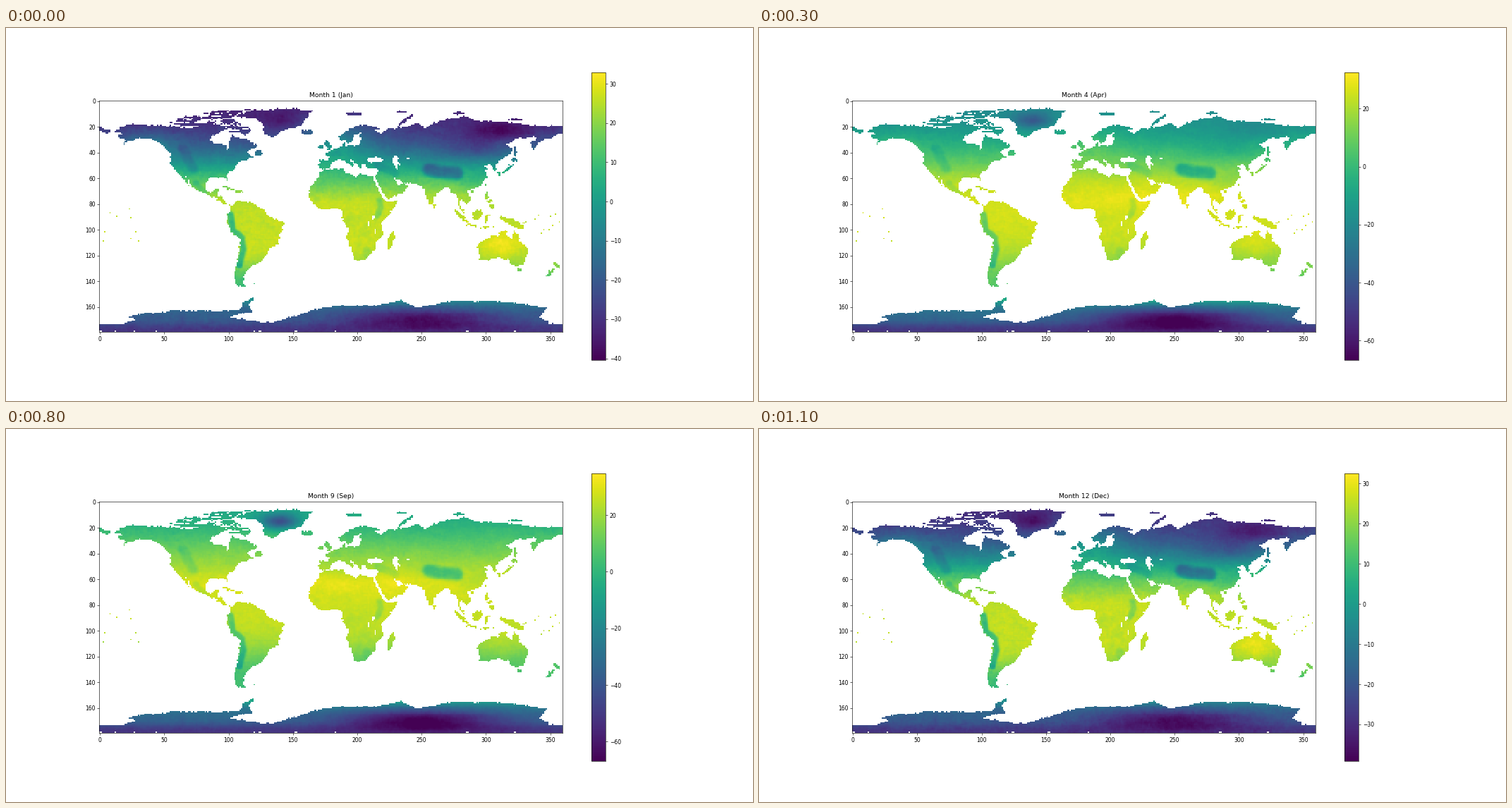
Recreate the animation shown at these times as a matplotlib script. Size 1059 px wide and 529 px high, loop 1.2 s.

```python
import numpy as np
import matplotlib.pyplot as plt
from matplotlib.animation import FuncAnimation
from matplotlib.path import Path

MONTHS = "Jan Feb Mar Apr May Jun Jul Aug Sep Oct Nov Dec".split()
# Colour range of each month
LOW = [-40.4, -47.1, -58, -66.7, -66.5, -67.1, -68.5, -68, -66.8, -58.9, -45.5, -39.1]
HIGH = [32.8, 32.1, 32.3, 32.4, 35.2, 37.4, 38.4, 37.9, 34.6, 30.9, 31.4, 32.4]

rng = np.random.default_rng(4)
lon, lat = np.meshgrid(np.arange(360) - 179.5, 89.5 - np.arange(180))
land = np.zeros(lon.shape, bool)


def noise(nx, ny):
    """Box-blurred random field with unit variance."""
    a = rng.normal(size=lon.shape)
    a = sum(np.roll(a, k, 1) for k in range(nx))
    a = sum(np.roll(a, k, 0) for k in range(ny))
    return a / a.std()


# Shapes are tested on slightly shaken cells, which crinkles every coast
shaken_x = lon + 0.4 * noise(2, 2)
shaken_y = lat + 0.3 * noise(2, 2)
cells = np.column_stack([shaken_x.ravel(), shaken_y.ravel()])


def polygon(*xy):
    inside = Path(np.reshape(xy, (-1, 2))).contains_points(cells)
    return inside.reshape(land.shape)


def shape(*xy):
    land[polygon(*xy)] = True


def blob(x, y, rx, ry, tilt=0, fill=True):
    """Tilted ellipse of land, or of water when fill is False."""
    a = np.radians(tilt)
    dx, dy = shaken_x - x, shaken_y - y
    u = (dx * np.cos(a) + dy * np.sin(a)) / rx
    v = (dy * np.cos(a) - dx * np.sin(a)) / ry
    land[u**2 + v**2 < 1] = fill


# Canadian Arctic: one region broken into horizontal streaks
arctic = polygon(-125, 70, -125, 74.5, -105, 78.5, -92, 81.5, -63, 83, -78, 76,
                 -62, 67, -66, 62.5, -78, 65, -88, 69)
land |= arctic & (noise(8, 1) > -0.25)

# North America
shape(-168, 66, -157, 71.2, -128, 70, -108, 68, -94, 72, -82, 69, -87, 64.5, -94.5, 60,
      -92, 57, -82, 55, -80, 51.3, -79, 54.5, -77.5, 62.5, -70, 60, -65, 60, -56, 53,
      -66, 50, -65, 48.5, -60, 46, -66, 43.6, -70.5, 42, -76, 36, -81, 31.5, -80.3, 25.3,
      -83, 29.7, -94, 29.5, -97.6, 25, -96, 19, -91.5, 18.6, -90, 21.3, -87, 21.3,
      -88.5, 15.9, -83.4, 15, -82, 9, -77.3, 8.2, -83, 8.4, -88, 13, -95, 16, -105.5, 20.5,
      -113, 31, -110, 23.2, -115, 29, -120.6, 34.6, -124.3, 41, -124.5, 48.5, -133, 57,
      -140, 59.8, -150, 60.5, -163, 54.8, -158, 58.7, -165.5, 61.5, -161.5, 64)
shape(-73, 78.2, -60, 82, -32, 83.6, -14, 81.8, -19, 76, -23, 70.3, -40, 65.5,
      -44.5, 60.5, -52, 64, -52, 70, -58, 75.5, -71, 77)
blob(-56, 49, 2.8, 2)
blob(-79.5, 21.8, 5, 0.8, -15)
blob(-71, 19, 2.8, 0.9)

# South America
shape(-77.5, 8, -72, 12, -62, 10.6, -51, 4, -49, 0, -35.5, -5.3, -39, -14, -41, -22,
      -48, -25.5, -49, -29, -54, -34.5, -57.5, -37.5, -62, -39, -65, -42.5, -67, -46,
      -69, -51, -66, -55, -71, -54.5, -75.3, -49, -73.7, -40, -71.5, -30, -70.3, -18.5,
      -76, -14, -81, -5.5, -80, 1, -77.5, 4)
blob(-59.5, -51.8, 1.6, 0.5)

# Africa
shape(-6, 35.8, 10.5, 37.1, 11, 33.8, 20, 30.6, 22, 32.8, 32.5, 31, 35.5, 24, 38, 18,
      43, 11.5, 51.2, 11.8, 47, 3, 39.5, -5, 40.6, -15, 35, -20, 35.4, -24, 32.5, -28,
      27, -33.8, 19, -34.7, 14.5, -22.5, 12, -17, 13.5, -10, 9, -1, 9, 4, 4.5, 6.3,
      -7.5, 4.4, -13.3, 9, -17.2, 14.7, -16.5, 21, -10, 29.5)
blob(46.8, -18.8, 7, 2, 72)
blob(33, -1, 1.3, 1.5, fill=False)
blob(29.8, -6, 0.7, 2.4, fill=False)
blob(34.5, -12, 0.6, 2, fill=False)

# Europe and western Asia
shape(-9, 37.2, -9, 43.2, -1.5, 43.4, -1.2, 46, -4.6, 48.4, 2, 51, 8.3, 54, 10, 57.5,
      10.8, 54.2, 21, 55, 23.5, 59.5, 30, 60, 22, 60.3, 21.5, 63, 25, 65.5, 18, 62.5,
      17, 58, 13, 55.6, 11, 59, 8, 58, 5.3, 61, 14, 67.5, 25, 71, 40, 67.3, 34, 66.5,
      38, 64, 44, 67.5, 60, 69, 60, 25.5, 57, 26, 51, 28, 48.5, 30, 52, 24, 56.2, 26,
      59.8, 22.4, 55, 17.2, 43.5, 12.7, 39, 21, 34.8, 28.5, 36, 36.5, 27.5, 37, 26.5, 40.3,
      23.5, 40, 23, 36.8, 19.5, 41, 13, 45.6, 18.4, 40, 16, 38.2, 11, 43, 7, 43.8,
      3, 42.8, 0, 39, -2, 36.8, -5.5, 36.2)
blob(34.5, 43.4, 6.5, 2.1, fill=False)
blob(50.8, 41.8, 2.2, 5.3, 10, fill=False)
blob(59.6, 45, 1.3, 1.1, fill=False)
blob(-2.2, 54.2, 4.6, 1.8, 118)
blob(-8, 53.3, 2, 1.7)
blob(-18.8, 65, 5, 1.5)
blob(18, 79.1, 6.5, 1.2)
blob(58, 74, 7.5, 1.2, 35)
blob(56, 80.6, 6, 0.5)

# Eastern Asia
shape(60, 69, 68, 73, 73, 68, 80, 72.5, 104, 77.6, 113, 74, 140, 72.4, 160, 69.8,
      180, 69.8, 180, 65, 170, 60, 163, 58, 157, 51, 156, 57, 163, 62, 143, 59.3, 136, 54.8,
      141, 53, 140, 48.5, 131.5, 43, 127.5, 39.8, 129.3, 35.5, 126.5, 34.5, 125, 39.7,
      118, 39.2, 122, 37, 119.5, 35, 122, 30, 115, 22.7, 106, 19.5, 109, 12, 105, 8.7,
      100.9, 13.3, 100, 9, 103.5, 4, 104, 1.4, 100.4, 6, 98.5, 10, 97.5, 16.5, 94.3, 17,
      91, 22.5, 87, 21.3, 80.2, 15, 79.8, 10.3, 77.5, 8.2, 73, 17, 72.5, 21, 67, 25, 60, 25.5)
shape(-180, 69, -170, 66.2, -173, 64.4, -180, 65.5)
blob(99, 79.5, 5, 0.9)
blob(144, 75, 6, 0.7)
blob(143, 50, 4.2, 0.9, 98)
blob(142.8, 43.4, 2.2, 1.3)
blob(137, 36.2, 5.8, 1.3, 38)
blob(131, 32.6, 0.9, 1.4)
blob(121, 23.7, 0.7, 1.5)
blob(109.8, 19.2, 1.1, 0.9)
blob(80.7, 7.6, 0.9, 1.7)

# Islands between Asia and Australia
blob(121.3, 16, 1.1, 2.7)
blob(123.8, 11.3, 2, 1.1)
blob(125, 7.5, 1.6, 1.7)
blob(114, 1, 5, 3.1, 42)
blob(101, -0.2, 7.4, 1.4, -46)
blob(110, -7.3, 4.8, 0.8, -9)
blob(121, -8.7, 5.5, 0.5)
blob(120.6, -2.5, 1.1, 3.2)
blob(122.4, 0.8, 2.3, 0.6)
blob(132.8, -1.8, 1.9, 1.1)
blob(142, -5.8, 8.6, 2.5, -25)
blob(150, -5.5, 2, 0.7, 25)

# Australia and New Zealand
shape(113.7, -22.5, 115.7, -32, 115.2, -34.5, 123.5, -34, 131, -31.5, 135.8, -34.9,
      138, -33.5, 140, -37.8, 146.3, -39, 150, -37.5, 153.4, -28.5, 150.8, -23, 146.3, -19,
      145.3, -15, 142.5, -10.8, 140.8, -17.5, 135.5, -15, 136.8, -12.2, 132.5, -11.5,
      129.5, -15, 126, -14, 122.2, -18)
blob(146.6, -42, 1.7, 1.3)
blob(175.6, -38.6, 3.6, 1.3, -52)
blob(170.4, -43.8, 4.4, 1.2, 43)

# Antarctica
shape(-180, -84, -162, -84, -151, -80, -157, -78.2, -146, -75.8, -121, -73.3, -88, -73.6,
      -71, -72.5, -68, -67.2, -59.5, -63.6, -64, -69, -61, -74.5, -80, -78, -62, -81,
      -54, -82.8, -44, -82.4, -25, -76.6, -11.4, -72, 5, -70, 35, -69.3, 54.4, -65.7,
      68, -71.5, 90, -66.5, 125.7, -65.7, 150, -68.4, 169, -71.8, 162, -78, 168, -81.5,
      170, -84, 180, -84, 180, -90, -180, -90)

# Scattered ocean islets
for x, y in rng.uniform((158, -20), (215, 9), (18, 2)):
    land[int(90 - y), int(x + 180) % 360] = True


def step(x):
    return 1 / (1 + np.exp(-x))


def bump(x, y, rx, ry):
    return np.exp(-(((lon - x) / rx) ** 2) - ((lat - y) / ry) ** 2)


def ridge(width, *xy):
    """Flat-topped mountain belt along a line."""
    pts = np.reshape(xy, (-1, 2))
    best = np.full(lon.shape, np.inf)
    for (x0, y0), (x1, y1) in zip(pts, pts[1:]):
        dx, dy = x1 - x0, y1 - y0
        t = np.clip(((lon - x0) * dx + (lat - y0) * dy) / (dx * dx + dy * dy), 0, 1)
        best = np.minimum(best, np.hypot(lon - x0 - t * dx, lat - y0 - t * dy))
    return np.exp(-((best / width) ** 4))


# Land temperature: zonal curves, mountains, then regional warmth and cold
jan = 27 - 62 * step((lat - 42) / 12) - 20 * step((-lat - 42) / 5)
jul = 27 - 30 * step((lat - 62) / 9) - 27 * step((-lat - 26) / 8) + 5 * bump(0, 26, 1e3, 10)
heights = (16 * ridge(2.6, -78, 1, -76, -11, -69, -17, -68, -26, -71, -38)
           + 19 * ridge(5, 76, 36, 84, 34, 98, 33)
           + 7 * ridge(2.5, 38, 12, 39, 7, 36, 0)
           + 6 * ridge(4, -115, 52, -107, 37)
           + 6 * ridge(2.5, -105, 25, -98, 18)
           + 5 * ridge(3, 36, 39, 50, 33)
           + 4 * ridge(3, 28, -30, 28, -27))
europe = bump(3, 57, 30, 18)
pacific = bump(-140, 56, 24, 10)
siberia = bump(112, 52, 25, 10)
yakutia = bump(132, 66, 24, 7)
desert = bump(5, 26, 24, 7) + bump(50, 27, 14, 9)
outback = bump(133, -22, 14, 8)
china = bump(112, 27, 12, 8)
ice_cap = bump(-40, 74, 15, 6)
jan += 17 * europe + 10 * pacific - 9 * siberia - 12 * yakutia + 5 * outback
jan += 3 * bump(0, 10, 120, 9) - 4 * china - 5 * ice_cap - heights
jul += 4 * desert - 3 * europe - 3 * pacific + 3 * yakutia + outback
jul -= 4 * china + 46 * ice_cap + 2 * bump(20, 0, 20, 8) + heights

# Antarctic temperature: cooler inland, coldest on the eastern plateau
inland = np.maximum(-lat - 65.5, 0)
ice_summer = -4 - 15 * (1 - np.exp(-inland / 5)) - 9 * step((-lat - 84) / 1.5)
ice_summer -= 18 * bump(70, -80, 60, 8)
ice_winter = 1.85 * ice_summer

ice = lat < -60
grain = 0.5 * noise(2, 2) + 0.6 * noise(6, 4)
dry_belt = bump(60, 15, 75, 8)


def field(m):
    season = (1 - np.cos(2 * np.pi * (m - 0.3) / 12)) / 2
    spring = 4 * np.exp(-(((m - 3.5) / 1.8) ** 2))
    cold = np.clip((-39 - LOW[m]) / 28, 0, 1)
    soil = jan + (jul - jan) * season + spring * dry_belt
    frozen = ice_summer + (ice_winter - ice_summer) * cold
    t = np.clip(np.where(ice, frozen, soil) + grain, LOW[m], HIGH[m])
    return np.where(land, t, np.nan)


fig, ax = plt.subplots(figsize=(19.2, 9.591), dpi=55.15625)
img = ax.imshow(field(0), vmin=LOW[0], vmax=HIGH[0], cmap="viridis", interpolation="nearest")
fig.colorbar(img, ax=ax)


def draw(m):
    img.set_data(field(m))
    img.set_clim(LOW[m], HIGH[m])
    ax.set_title(f"Month {m + 1} ({MONTHS[m]})")
    return [img]


anim = FuncAnimation(fig, draw, frames=12, interval=100, repeat=True, repeat_delay=0)
plt.show()
```
